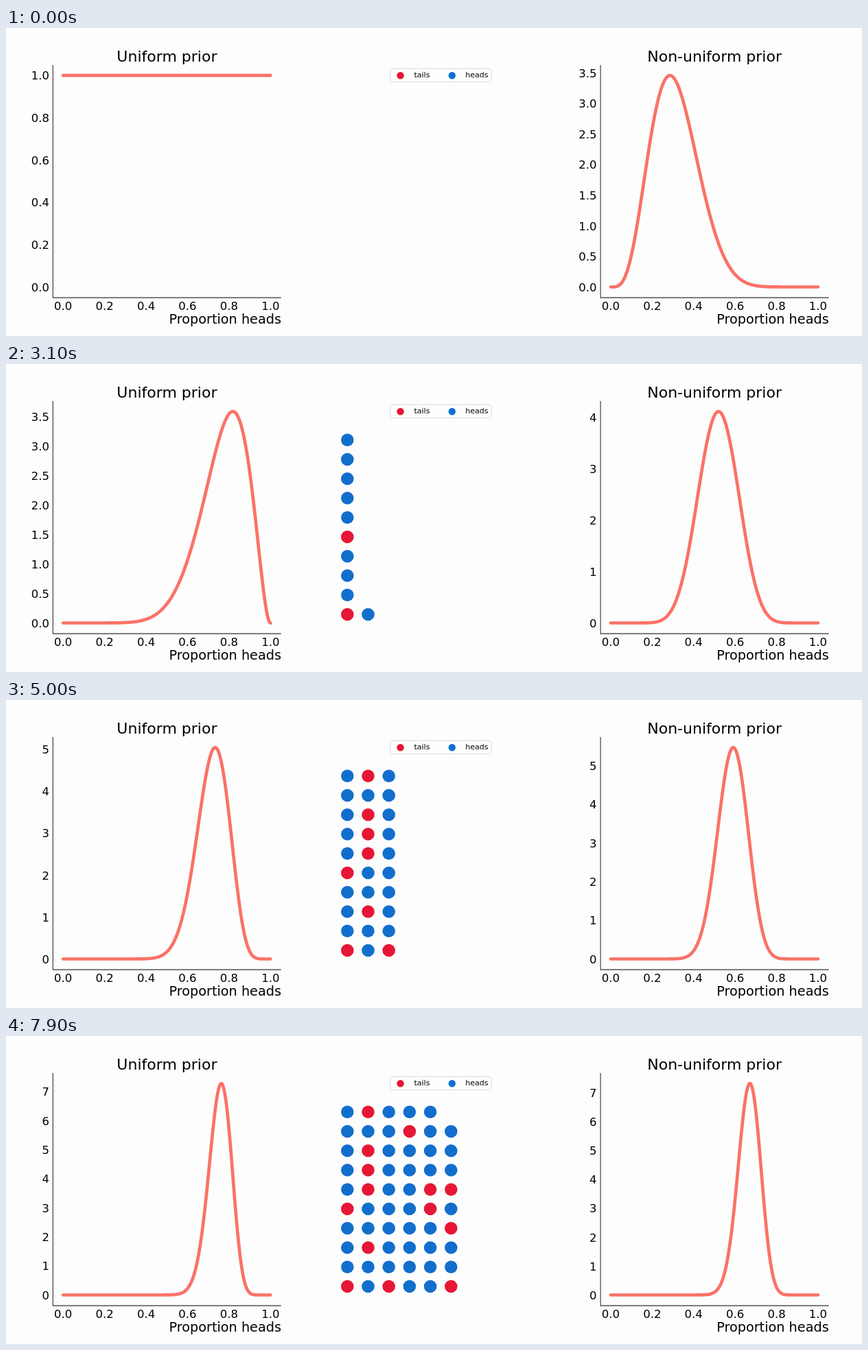
An HTML page for the animation above (8000 ms loop, 1247 px wide and 449 px high).

```html
<!DOCTYPE html>
<html lang="en">
<head>
<meta charset="utf-8">
<title>Coin flips and two priors</title>
<style>
  html, body { margin: 0; width: 100%; height: 100%; overflow: hidden; background: #fdfdfd; }
  svg { display: block; width: 100%; height: 100%; font-family: "DejaVu Sans", sans-serif; }
  .title { font-size: 22px; text-anchor: middle; }
  .label { font-size: 19.25px; text-anchor: end; }
  .tick { font-size: 16.5px; }
  .legend { font-size: 11px; }
  .spine { fill: none; stroke: #333; stroke-width: 1.1; }
  .curve { fill: none; stroke: #fa7268; stroke-width: 4.7; stroke-linecap: round; stroke-linejoin: round; }
  .tails { fill: #e61735; }
  .heads { fill: #126ecd; }
</style>
</head>
<body>
<svg id="stage" viewBox="0 0 1247 449">
  <rect x="559.5" y="59.5" width="147.5" height="19" rx="2.2" fill="#fefefe" stroke="#dcdce2"/>
  <circle class="tails" cx="574.6" cy="69.2" r="5.2"/>
  <circle class="heads" cx="649.8" cy="69.2" r="5.2"/>
  <text class="legend" x="594.5" y="72.3">tails</text>
  <text class="legend" x="669.2" y="72.3">heads</text>
</svg>
<script>
const stage = document.getElementById('stage');
const FLIPS = 'THHHTHHHHH' + 'HHTHHTTTHT' + 'THHHHHHHHH' + 'HHHHHHHHTH' + 'HHHHTTHHHH' + 'THHTHTHHH';
const LOOP = 8000, STEP = 100, FIRST_FLIP = 20;
const X0 = 83.2, X_SPAN = 302.1, Y0 = 377.5, Y_SPAN = 308.3, SAMPLES = 300;

function add(parent, tag, attrs, text) {
  const el = document.createElementNS('http://www.w3.org/2000/svg', tag);
  for (const key in attrs) el.setAttribute(key, attrs[key]);
  if (text !== undefined) el.textContent = text;
  return parent.appendChild(el);
}

function makePlot(left, title, titleX, a, b) {
  const g = add(stage, 'g', { transform: `translate(${left} 0)` });
  add(g, 'text', { class: 'title', x: titleX, y: 49.3 }, title);
  add(g, 'text', { class: 'label', x: 401, y: 431.2 }, 'Proportion heads');
  for (let i = 0; i <= 5; i++) {
    add(g, 'text', { class: 'tick', x: X0 + X_SPAN * i / 5, y: 411, 'text-anchor': 'middle' }, (i / 5).toFixed(1));
  }
  const curve = add(g, 'path', { class: 'curve' });
  add(g, 'path', { class: 'spine', d: 'M68.4 54V393.1H400.8' });
  return { a, b, curve, ticks: add(g, 'g', { class: 'tick', 'text-anchor': 'end' }) };
}

function factorial(n) {
  let product = 1;
  for (let i = 2; i <= n; i++) product *= i;
  return product;
}

function betaDensity(a, b) {
  const scale = factorial(a + b - 1) / factorial(a - 1) / factorial(b - 1);
  return x => scale * x ** (a - 1) * (1 - x) ** (b - 1);
}

function tickStep(max) {
  const raw = 1.1 * max / 9;
  const base = 10 ** Math.floor(Math.log10(raw));
  return base * [1, 2, 2.5, 5, 10].find(s => s * base >= raw);
}

function drawPlot(plot, heads, tails) {
  const density = betaDensity(plot.a + heads, plot.b + tails);
  const values = Array.from({ length: SAMPLES + 1 }, (_, i) => density(i / SAMPLES));
  const max = Math.max(...values);
  const yOf = v => Y0 - Y_SPAN * v / max;
  plot.curve.setAttribute('d', 'M' + values.map((v, i) =>
    `${(X0 + X_SPAN * i / SAMPLES).toFixed(2)} ${yOf(v).toFixed(2)}`).join('L'));

  const step = tickStep(max);
  const digits = step >= 1 ? 0 : Math.abs(step - 0.25) < 0.01 ? 2 : 1;
  plot.ticks.replaceChildren();
  for (let i = 0; i * step <= 1.05 * max; i++) {
    add(plot.ticks, 'text', { x: 62.9, y: yOf(i * step) + 6.2 }, (i * step).toFixed(digits));
  }
}

const plots = [
  makePlot(0, 'Uniform prior', 234.4, 1, 1),
  makePlot(797.7, 'Non-uniform prior', 234.4, 5, 11)
];
const coins = [...FLIPS].map((side, i) => add(stage, 'circle', {
  class: side === 'T' ? 'tails' : 'heads',
  cx: 497.3 + 30.2 * Math.floor(i / 10),
  cy: 365 - 28.25 * (i % 10),
  r: 9.3
}));

let shown = -1;
function render(now) {
  const count = Math.max(0, Math.floor(now % LOOP / STEP) - FIRST_FLIP);
  if (count !== shown) {
    shown = count;
    const heads = FLIPS.slice(0, count).split('H').length - 1;
    plots.forEach(plot => drawPlot(plot, heads, count - heads));
    coins.forEach((coin, i) => coin.setAttribute('visibility', i < count ? 'visible' : 'hidden'));
  }
}

const start = performance.now();
function loop() {
  render(performance.now() - start);
  requestAnimationFrame(loop);
}
loop();
</script>
</body>
</html>
```
